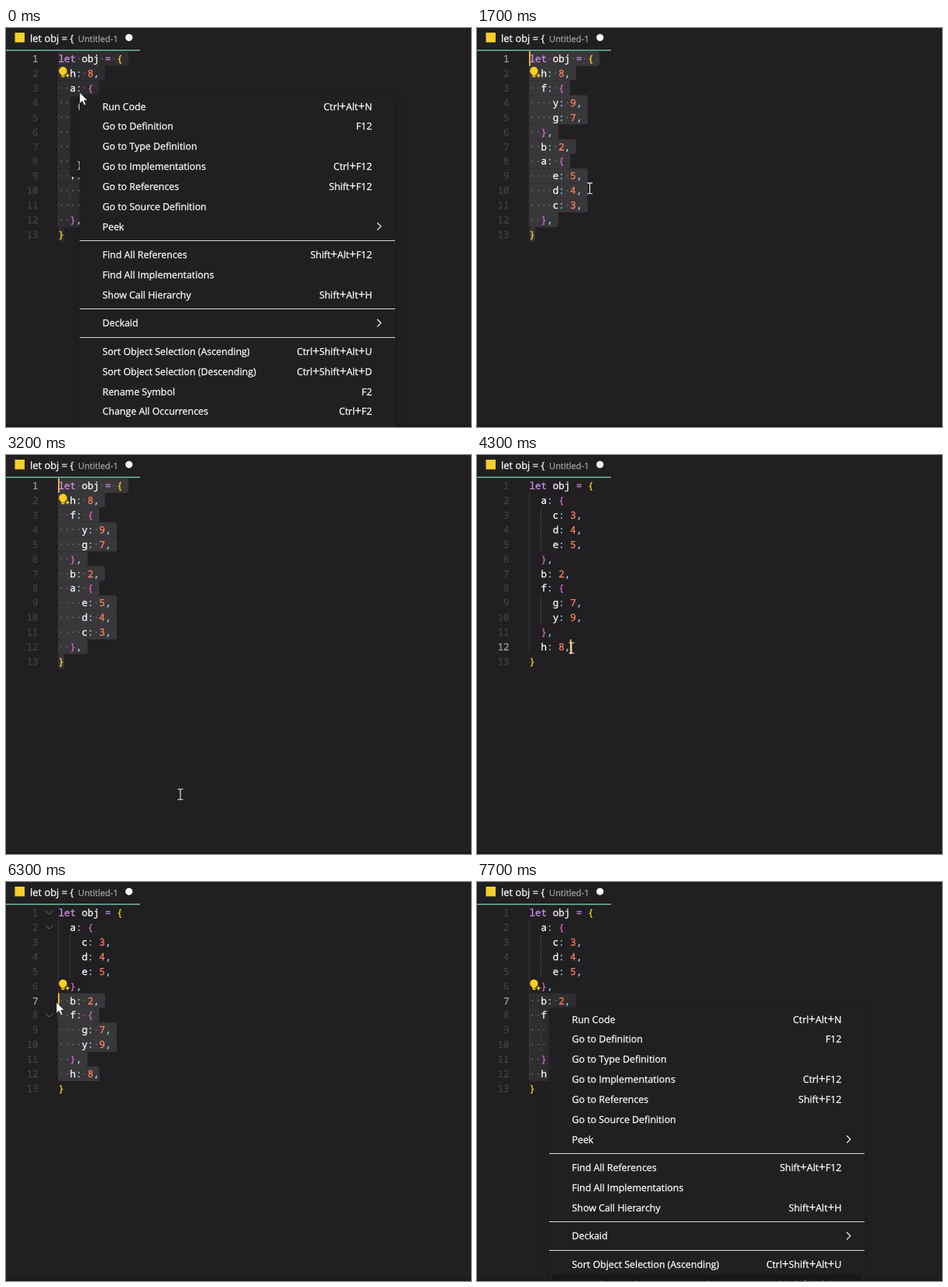
Write an HTML page that moves like this. It is 600 px wide and 515 px high and loops after 8000 ms.

```html
<!DOCTYPE html>
<html lang="en">
<head>
<meta charset="utf-8">
<title>Sort object menu</title>
<style>
html, body { margin: 0; width: 100%; height: 100%; overflow: hidden; background: #221f22; }
svg { display: block; width: 600px; height: 515px; }
text { white-space: pre; text-rendering: geometricPrecision; }
text, tspan { fill: currentColor; stroke: currentColor; stroke-width: .28; }
.code { font: 500 12.58px "Noto Sans Mono", monospace; }
.tip { font-size: 12.8px; color: #dcdadd; }
.ui { font: 12.4px "Open Sans", "Noto Sans", sans-serif; color: #fcfcfa; }
.title { font-size: 12.9px; }
.note { font-size: 11.2px; color: #a3a1a4; }
.plus { font-size: 15.3px; }
</style>
</head>
<body>
<svg viewBox="0 0 600 515">
  <rect x="11.5" y="6" width="12.5" height="12.5" fill="#f5d02c"/>
  <text class="ui title" x="31" y="17.7">let obj = {</text>
  <text class="ui note" x="93" y="17.7">Untitled-1</text>
  <circle cx="158.7" cy="12.3" r="4.6" fill="#fcfcfa"/>
  <rect y="28" width="173" height="1.4" fill="#72c4a9"/>
  <g id="scene"></g>
  <rect y="512.5" width="600" height="2.5" fill="#19181a"/>
  <g id="menu"></g>
  <g id="pointer"></g>
</svg>
<script>
const LOOP = 8000, STEP = 100;
const CH = 7.548, ROW = 18.92, LEFT = 67.5, TOP = 29.9;
const ITEM = 25.85, GAP = 10.65;
const byId = id => document.getElementById(id);

const COLORS = { word: '#fcfcfa', key: '#c98fe8', num: '#ff8062', punct: '#8fdcf2', outer: '#ffd92e', inner: '#d66bd0' };

// Code versions: nested groups as "name:keys", plain values by letter
const VALUES = { b: 2, c: 3, d: 4, e: 5, g: 7, y: 9, h: 8 };
function program(order) {
  const lines = ['let obj = {'];
  for (const part of order.split(' ')) {
    const [name, keys] = part.split(':');
    if (!keys) { lines.push(`  ${name}: ${VALUES[name]},`); continue; }
    lines.push(`  ${name}: {`);
    for (const k of keys) lines.push(`    ${k}: ${VALUES[k]},`);
    lines.push('  },');
  }
  return [...lines, '}'];
}
const VERSIONS = [
  [0, program('h a:cde b f:yg')],
  [1500, program('h f:yg b a:edc')],
  [3500, program('a:cde b f:gy h')]
];

const MENUS = [
  { from: 0, to: 1100, x: 95, y: 87 },
  { from: 2400, to: 3100, x: 106, y: 105 },
  { from: 6900, to: LOOP, x: 93, y: 163 }
];
const ITEMS = [
  ['Run Code', 'Ctrl+Alt+N'], ['Go to Definition', 'F12'], ['Go to Type Definition'],
  ['Go to Implementations', 'Ctrl+F12'], ['Go to References', 'Shift+F12'],
  ['Go to Source Definition'], ['Peek', '>'], null,
  ['Find All References', 'Shift+Alt+F12'], ['Find All Implementations'],
  ['Show Call Hierarchy', 'Shift+Alt+H'], null, ['Deckaid', '>'], null,
  ['Sort Object Selection (Ascending)', 'Ctrl+Shift+Alt+U'],
  ['Sort Object Selection (Descending)', 'Ctrl+Shift+Alt+D'],
  ['Rename Symbol', 'F2'], ['Change All Occurrences', 'Ctrl+F2']
];

const PATH = [
  [0, 95, 83], [600, 226, 489], [800, 231, 438], [1200, 231, 438],
  [2000, 106, 100], [2500, 106, 100], [2900, 225, 438], [3400, 225, 438],
  [3600, 140, 262], [3700, 140, 262], [4300, 122, 249], [4400, 122, 249],
  [5200, 113, 182], [6200, 65, 155], [6300, 65, 155], [6700, 93, 158],
  [7100, 93, 158], [7600, 128, 518], [LOOP, 128, 518]
];

function mouseAt(t) {
  const i = Math.max(1, PATH.findIndex(p => p[0] >= t));
  const [t0, x0, y0] = PATH[i - 1], [t1, x1, y1] = PATH[i];
  const u = (t - t0) / (t1 - t0), e = u * u * (3 - 2 * u);
  return { x: x0 + (x1 - x0) * e, y: y0 + (y1 - y0) * e };
}

const rect = (x, y, w, h, fill, r = 0) =>
  `<rect x="${x}" y="${y}" width="${w}" height="${h}" rx="${r}" fill="${fill}"/>`;
const stroke = (d, color, w = 1) =>
  `<path d="${d}" fill="none" stroke="${color}" stroke-width="${w}"/>`;
const text = (cls, x, y, color, body, anchor = 'start') =>
  `<text class="${cls}" x="${x}" y="${y}" text-anchor="${anchor}" style="color:${color}">${body}</text>`;
const indentOf = s => s.search(/\S/);
const colX = c => LEFT + c * CH;
const rowY = r => TOP + r * ROW;

function colorize(line, row, last) {
  return line.replace(/let|=|[{}]|\d+|[:,]|[a-z]+/g, m => {
    let c = COLORS.word;
    if (m === 'let' || m === '=') c = COLORS.key;
    else if (/[{}]/.test(m)) c = row === 0 || row === last ? COLORS.outer : COLORS.inner;
    else if (/\d/.test(m)) c = COLORS.num;
    else if (/[:,]/.test(m)) c = COLORS.punct;
    return `<tspan style="color:${c}">${m}</tspan>`;
  });
}

// Selection start and end plus caret, as [row, col]
function selectionAt(t, lines) {
  if (t < 3800) return { a: [0, 0], b: [12, 1], caret: [0, 0] };
  const m = mouseAt(Math.min(t, 6200));
  const row = Math.min(12, Math.floor((m.y - TOP) / ROW));
  const col = Math.max(0, Math.min(lines[row].length, Math.round((m.x - LEFT) / CH)));
  const caret = [row, col];
  return { a: caret, b: t < 4400 ? caret : [11, 7], caret };
}

function bulb(row) {
  const y = rowY(row) + 6.5;
  return `<g transform="translate(73.5 ${y})"><circle r="5.2" fill="#ffcf1f"/>` +
    rect(-2.2, 4, 4.4, 4.2, '#ffcf1f', 1) + stroke('M-2.2 6.3h4.4', '#6b5a1c', .8) +
    '<path d="M5.8 2l1.1 2.9 2.9 1.1-2.9 1.1-1.1 2.9-1.1-2.9-2.9-1.1 2.9-1.1z" fill="#ffcf1f" stroke="#3a383b" stroke-width=".6"/></g>';
}

function editor(t, menuOpen) {
  const lines = VERSIONS.filter(v => v[0] <= t).pop()[1];
  const { a, b, caret } = selectionAt(t, lines);
  const fold = t >= 5800 && t < 6700 ? Math.min(1, (t - 5700) / 400, (6800 - t) / 300) : 0;
  const inBlock = indentOf(lines[caret[0]]) === 4;
  const selected = menuOpen ? '#2f2d30' : '#39373a';
  let out = '';
  lines.forEach((line, r) => {
    const y = rowY(r), base = y + 14.1, indent = indentOf(line);
    let from = 0, to = -1;
    if (r >= a[0] && r <= b[0]) {
      from = r === a[0] ? a[1] : 0;
      to = r === b[0] ? b[1] : line.length + 1;
    }
    if (to > from) out += rect(colX(from), y, (to - from) * CH, ROW + .1, selected, 3);
    for (let c = 0; c < indent; c += 2) {
      const lit = c === 2 && inBlock && Math.abs(r - caret[0]) <= 1;
      out += rect(Math.round(colX(c) - .5), y, 1, ROW, lit ? '#5d5b5e' : '#3b393c');
    }
    for (let c = from; c < Math.min(to, line.length); c++)
      if (line[c] === ' ') out += `<circle cx="${colX(c + .5)}" cy="${y + 9.6}" r=".95" fill="#6c6a6d"/>`;
    out += text('code', 41.5, base, r === caret[0] ? '#a09ea1' : '#434144', r + 1, 'end');
    out += text('code', LEFT, base, COLORS.word, colorize(line, r, lines.length - 1));
    if (fold && line.endsWith('{'))
      out += `<g opacity="${fold}">${stroke(`M51.5 ${y + 7.3}l4.6 4.6 4.6-4.6`, '#757376')}</g>`;
  });
  if (t < 3800) out += bulb(1);
  if (t >= 6100) out += bulb(5);
  if (!menuOpen) out += rect(colX(caret[1]) - .3, rowY(caret[0]), 1.7, ROW, '#ffc93c');
  return out;
}

function hover(x, y, w, lines, alpha) {
  const body = lines.map((s, i) =>
    `<text class="code tip" x="${x + 8.5}" y="${y + 17 + i * 19}">${s}</text>`).join('');
  return `<g opacity="${alpha}">${rect(x, y, w, lines.length * 19 + 9, '#221f22', 2)}${body}</g>`;
}

function popups(t) {
  if (t < 300)
    return hover(82.5, 88, 150, ['(property) a: {', '    c: number;', '    d: number;', '    e: number;', '}'], 1);
  if (t >= 2400 && t < 2700)
    return hover(98, 58.5, 170, ['(property) y: number'], t < 2500 ? .26 : 1);
  return '';
}

function menu(box, m) {
  let out = `<g style="filter:drop-shadow(0 0 4px #0003)">${rect(box.x, box.y, 407, 440, '#211f22', 3)}</g>`;
  let y = box.y + 14, over = false;
  for (const item of ITEMS) {
    if (!item) {
      out += rect(box.x, Math.ceil(y - 8.5), 407, 1, '#d5dcd9');
      y += GAP;
      continue;
    }
    const [label, key] = item;
    const hot = m.x > box.x + 4 && m.x < box.x + 403 && Math.abs(m.y - y) < ITEM / 2;
    const color = hot ? '#79b9a2' : '#fcfcfa';
    if (hot) { over = true; out += rect(box.x + 4, y - 13, 399, ITEM, '#18171a', 4); }
    out += text('ui', box.x + 29.5, y + 4.5, color, label);
    if (key === '>') out += stroke(`M${box.x + 384} ${y - 4.8}l4.8 4.8-4.8 4.8`, color, 1.2);
    else if (key) out += text('ui', box.x + 377.3, y + 4.5, color,
      key.replace(/\+/g, `<tspan class="plus">+</tspan>`), 'end');
    y += ITEM;
  }
  return { out, over };
}

const SHAPES = {
  arrow: '<path d="M0 0v14.6l3.4-3.2 2.4 5.4 2.4-1-2.3-5.3h4.6z" fill="#fff" stroke="#111" stroke-width=".7"/>',
  beam: stroke('M-3.5-6.8h2.6q.9 0 .9.9V5.9q0 .9-.9.9h-2.6M3.5-6.8H.9Q0-6.8 0-5.9V5.9q0 .9.9.9h2.6', '#f0eff0', 1.1),
  hand: '<path d="M-2 1.2a1.5 1.5 0 0 1 3 0v4.6l4.9 1q1.8.4 1.6 2.3l-.9 4.4-1 2.7h-6.4l-4.2-5.4q-.9-1.6.5-2 1-.2 2.5 1.3z" fill="#fff" stroke="#222" stroke-width=".7"/>'
};

function draw(t) {
  const m = mouseAt(t);
  const box = MENUS.find(b => t >= b.from && t < b.to);
  const list = box ? menu(box, m) : { out: '', over: false };
  byId('scene').innerHTML = editor(t, !!box) + popups(t);
  byId('menu').innerHTML = list.out;
  const shape = list.over ? 'hand' : box || m.x < LEFT ? 'arrow' : 'beam';
  byId('pointer').innerHTML = `<g transform="translate(${m.x} ${m.y})">${SHAPES[shape]}</g>`;
}

let shown = -1;
const start = performance.now();
function tick() {
  const t = Math.floor(((performance.now() - start) % LOOP) / STEP) * STEP;
  if (t !== shown) draw(shown = t);
  requestAnimationFrame(tick);
}
tick();
</script>
</body>
</html>
```
